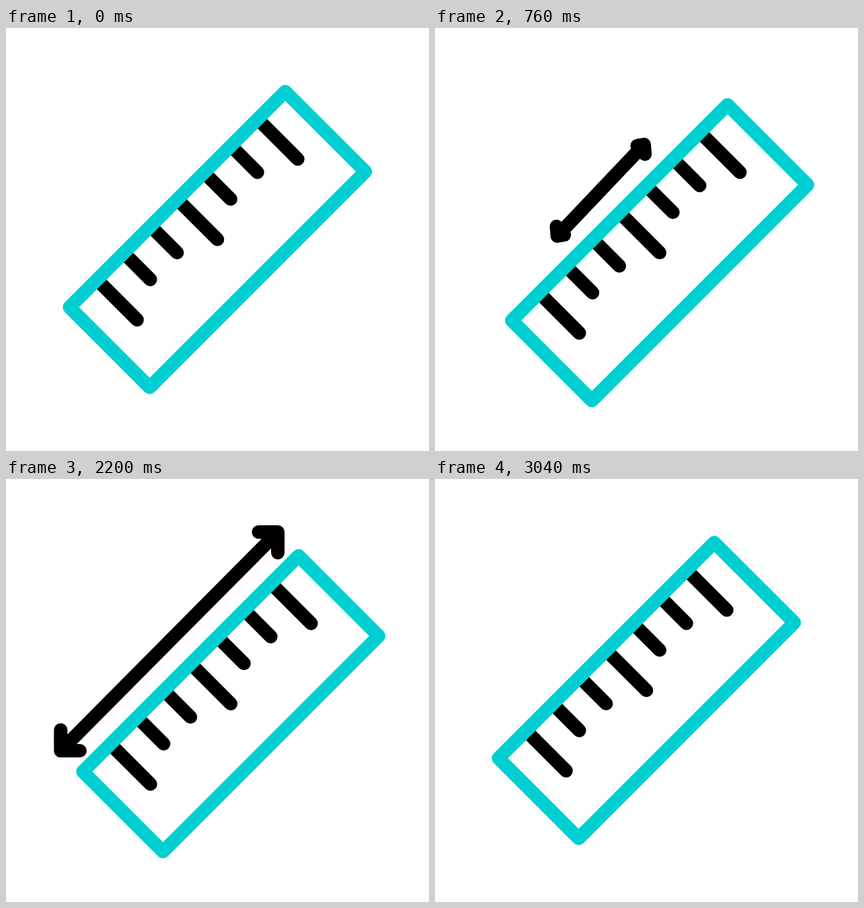
Animation of 640 by 640 pixels, one loop 3600 ms. Source, as an HTML page with a canvas:

```html
<!DOCTYPE html>
<html lang="en">
<head>
<meta charset="utf-8">
<title>Ruler</title>
<style>
  html, body { margin: 0; width: 100%; height: 100%; overflow: hidden; background: #fff; }
  canvas { display: block; width: 100vmin; height: 100vmin; }
</style>
</head>
<body>
<canvas id="stage" width="640" height="640"></canvas>
<script>
const SIZE = 640, LOOP = 3600, STEP = 20;
const CYAN = '#00cfd1', BLACK = '#000';
const ctx = document.getElementById('stage').getContext('2d');

const ruler = { center: 319.9, halfLength: 230.8, halfWidth: 85.7, spacing: 57.3, shortTick: -29, slide: 20.2 };
const arrow = { x: 247, y: 245.7, tipX: 164.5, tipY: 165.7, armX: 29.2, armY: 31.4 };

const progress = (t, start, end) => Math.min(1, Math.max(0, (t - start) / (end - start)));
const mix = (from, to, amount) => from + (to - from) * amount;

// Symmetric cubic Bezier (0.76, 0, 0.24, 1), solved by bisection.
function easeInOut(u) {
  const a = 0.76;
  let low = 0, high = 1;
  for (let i = 0; i < 24; i++) {
    const s = (low + high) / 2, r = 1 - s;
    const x = 3 * a * s * r * r + 3 * (1 - a) * s * s * r + s * s * s;
    if (x < u) low = s; else high = s;
  }
  return low * low * (3 - 2 * low);
}

// Drawn lying flat, then turned so that its length rises to the right.
function drawRuler(shift) {
  const { center, halfLength, halfWidth, spacing, shortTick } = ruler;
  ctx.save();
  ctx.translate(center + shift, center + shift);
  ctx.rotate(-Math.PI / 4);
  ctx.beginPath();
  for (let i = -3; i <= 3; i++) {
    ctx.moveTo(i * spacing, 3 - halfWidth);
    ctx.lineTo(i * spacing, i % 3 ? shortTick : 0);
  }
  ctx.strokeStyle = BLACK;
  ctx.stroke();
  ctx.strokeStyle = CYAN;
  ctx.strokeRect(-halfLength, -halfWidth, 2 * halfLength, 2 * halfWidth);
  ctx.restore();
}

// Both heads are the same shape, mirrored through the centre.
function drawArrow(size, seedX, seedY) {
  const x = mix(seedX, arrow.x, size), y = mix(seedY, arrow.y, size);
  const tipX = mix(-2, arrow.tipX, size), tipY = mix(-3, -arrow.tipY, size);
  const endX = (arrow.tipX - arrow.armX) * size, endY = (arrow.armY - arrow.tipY) * size;
  ctx.beginPath();
  for (const side of [1, -1]) {
    const point = (px, py) => [x + side * px, y + side * py];
    ctx.moveTo(...point(endX, -arrow.tipY * size));
    ctx.lineTo(...point(tipX, tipY));
    ctx.lineTo(...point(arrow.tipX * size, endY));
    ctx.moveTo(x, y);
    ctx.lineTo(...point(tipX, tipY));
  }
  ctx.strokeStyle = BLACK;
  ctx.stroke();
}

function draw(t) {
  ctx.fillStyle = '#fff';
  ctx.fillRect(0, 0, SIZE, SIZE);
  ctx.lineWidth = 20.4;
  ctx.lineCap = ctx.lineJoin = 'round';

  const grow = progress(t, 545, 1480), shrink = progress(t, 2180, 2728);
  if (shrink > 0 && shrink < 1) drawArrow(1 - shrink ** 2, 240.4, 232.4);
  else if (grow > 0 && shrink === 0) drawArrow(1 - (1 - grow) ** 2, 253.3, 245.4);

  const slide = easeInOut(progress(t, 0, 860)) - easeInOut(progress(t, 2180, 3040));
  drawRuler(ruler.slide * slide);
}

const origin = performance.now();
function tick() {
  const t = (performance.now() - origin) % LOOP;
  draw(Math.floor(t / STEP) * STEP);
  requestAnimationFrame(tick);
}
tick();
</script>
</body>
</html>
```
